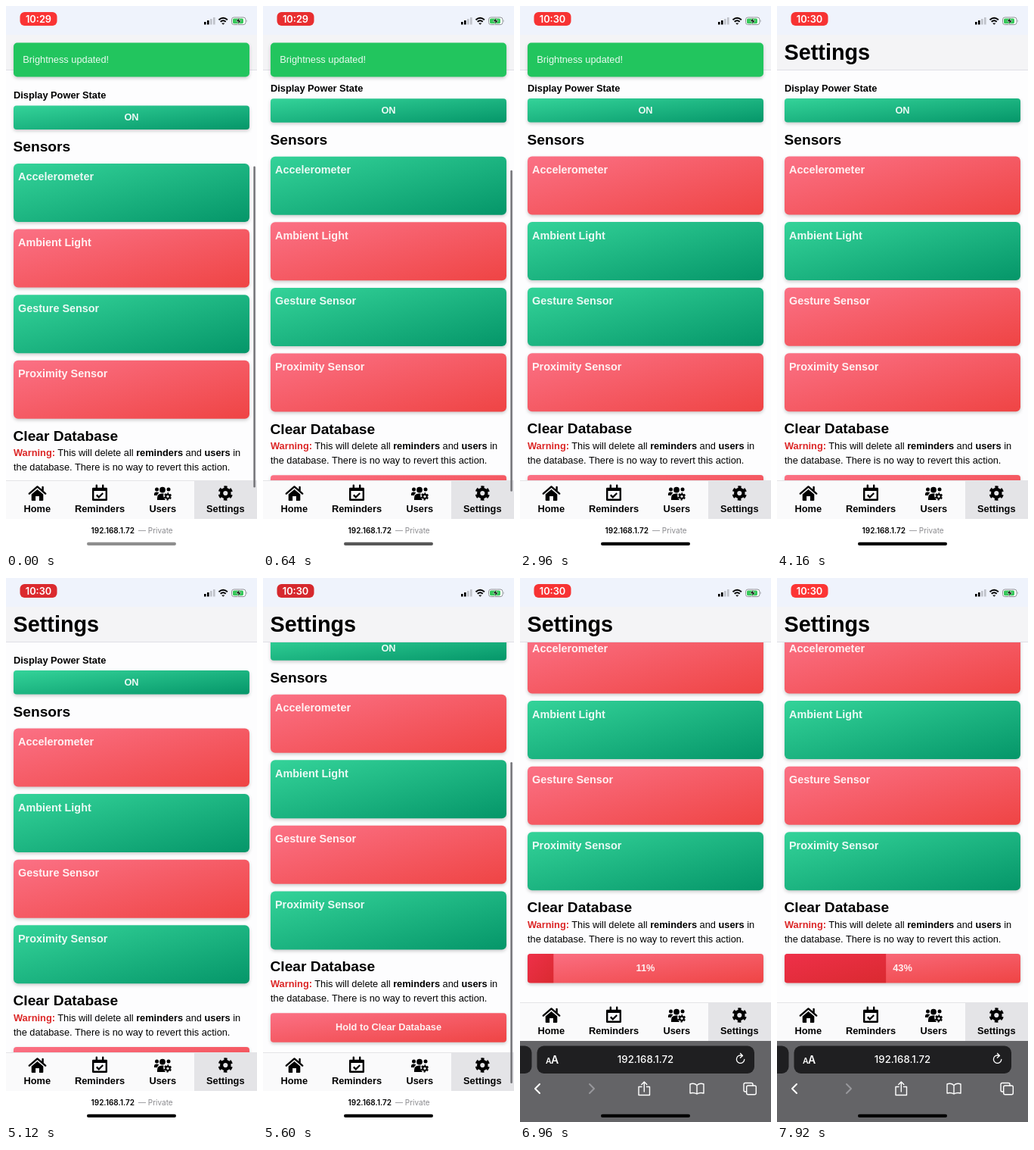
An HTML page for the animation above (8000 ms loop, 332 px wide and 718 px high).

```html
<!DOCTYPE html>
<html lang="en">
<head>
<meta charset="utf-8">
<title>Settings</title>
<style>
  html, body { margin: 0; height: 100%; overflow: hidden; background: #fdfdfe; }
  svg { display: block; width: 100vw; height: 100vh; font: 12.8px "Liberation Sans", Arial, sans-serif; }
  .b { font-weight: 700; }
  .h2 { font-size: 19.2px; }
  .mid { text-anchor: middle; }
  .pale { fill: #fff; fill-opacity: .9; }
  .ui { font-family: Inter, sans-serif; font-weight: 600; }
  .card { filter: drop-shadow(0 2px 2px #0003); }
  .line { fill: none; stroke: #fff; stroke-width: 1.6; stroke-linecap: round; stroke-linejoin: round; }
</style>
</head>
<body>
<svg viewBox="0 0 332 718">
  <defs>
    <linearGradient id="green" x2="1" y2="1"><stop stop-color="#34d399"/><stop offset="1" stop-color="#059669"/></linearGradient>
    <linearGradient id="red" x2="1" y2="1"><stop stop-color="#fb7185"/><stop offset="1" stop-color="#ef4444"/></linearGradient>
    <linearGradient id="deep" x2="1" y2="1"><stop stop-color="#ee3049"/><stop offset="1" stop-color="#da2a30"/></linearGradient>
    <clipPath id="holdClip"><rect x="10" y="619" width="312" height="38.5" rx="4"/></clipPath>
    <g id="gear" fill="none" stroke="#000">
      <circle r="5.2" stroke-width="4.2"/>
      <circle r="8" stroke-width="3.4" stroke-dasharray="4.4 3.978" stroke-dashoffset="2.2" transform="rotate(-90)"/>
    </g>
  </defs>

  <g id="content">
    <text class="b" x="10" y="112.5">Display Power State</text>
    <rect class="card" x="10" y="122" width="312" height="31.5" rx="4" fill="url(#green)"/>
    <text class="b mid pale" x="166" y="141.8">ON</text>
    <text class="b h2" x="9.5" y="182.5">Sensors</text>
    <g id="cards"></g>
    <text class="b h2" x="9.5" y="564.3">Clear Database</text>
    <text x="10" y="584.6"><tspan class="b" fill="#dc2626">Warning:</tspan> This will delete all <tspan class="b">reminders</tspan> and <tspan class="b">users</tspan> in</text>
    <text x="10" y="603.8">the database. There is no way to revert this action.</text>
    <rect class="card" x="10" y="619" width="312" height="38.5" rx="4" fill="url(#red)"/>
    <rect id="fill" x="10" y="619" height="38.5" fill="url(#deep)" clip-path="url(#holdClip)"/>
    <text id="hold" class="b mid pale" x="166" y="642.2"></text>
  </g>

  <rect width="332" height="38" fill="#eff3fc"/>
  <rect y="38" width="332" height="46" fill="#f4f4f6"/>
  <rect y="84" width="332" height="1" fill="#dfdfe6"/>
  <text class="b" x="9.5" y="71" font-size="28.8">Settings</text>

  <rect id="pill" x="18.5" y="8" width="49" height="18" rx="6"/>
  <text id="clock" class="ui mid" x="43" y="21.6" font-size="12.8" fill="#fff"></text>
  <path d="M262 21h2.6v3.5h-2.6zM266 19h2.6v5.5H266z"/>
  <path d="M270 17h2.6v7.5H270zM274 15h2.6v9.5H274z" fill="#bfc2c9"/>
  <g fill="none" stroke="#000" stroke-width="2">
    <path d="M281.5 18.2q5.7-5 11.4 0M283.7 20.8q3.5-3 7 0"/>
    <path d="M285.8 23l1.4 1.2 1.4-1.2z" stroke-width="1"/>
  </g>
  <rect x="298.5" y="15" width="18.5" height="9.6" rx="3" fill="#fff" stroke="#8d9096"/>
  <rect x="300" y="16.4" width="14" height="6.8" rx="1.6" fill="#34c759"/>
  <path d="M318.3 18v3.6q1.4-1.8 0-3.6" fill="#8d9096"/>
  <path d="M309 14.8l-4.6 5.6h3l-1 4.4 4.6-5.8h-3z" stroke="#fff" stroke-width=".5"/>

  <g id="toast">
    <rect class="card" x="10" y="48.5" width="312" height="45" rx="5" fill="#22c55e"/>
    <text class="pale" x="22.3" y="75">Brightness updated!</text>
  </g>

  <g id="dock">
    <rect y="626" width="332" height="51" fill="#fafafb"/>
    <rect x="249" y="626" width="83" height="51" fill="#e4e4e7"/>
    <rect y="626" width="332" height="1" fill="#e4e4e7"/>
    <g class="b mid">
      <text x="41.3" y="668.3">Home</text>
      <text x="124" y="668.3">Reminders</text>
      <text x="207.3" y="668.3">Users</text>
      <text x="290.3" y="668.3">Settings</text>
    </g>
    <path d="M30.8 643.6L41.5 634.4 52.2 643.6M48.6 640v-5" fill="none" stroke="#000" stroke-width="2.4" stroke-linecap="round" stroke-linejoin="round"/>
    <path d="M41.5 638l-7.8 6.6v7.4q0 1 1 1h4.4v-6h4.8v6h4.4q1 0 1-1v-7.4z"/>
    <path d="M115.2 637h17.6v14.8h-17.6zM119.8 632.8v4M128.2 632.8v4" fill="none" stroke="#000" stroke-width="2.4" stroke-linecap="round" stroke-linejoin="round"/>
    <path d="M115 636h18v4h-18z"/>
    <path d="M119.8 645.4l3 3 5.4-5.4" fill="none" stroke="#000" stroke-width="2.2"/>
    <circle cx="199.5" cy="638" r="2.5"/><circle cx="207" cy="638.6" r="3.9"/><circle cx="215" cy="638" r="2.5"/>
    <path d="M196 646v-1.800q0-2.700 3-2.700 2.200 0 3.400 1-2 1.400-2.400 3.500zM200 652v-2.500q0-6 6-6h2.600q-1.400 4.500 2.400 8.500z"/>
    <use href="#gear" transform="translate(214 647.300) scale(.53)"/>
    <use href="#gear" transform="translate(290.300 643)"/>

    <rect y="677" width="332" height="110" fill="#fff"/>
    <g id="smallBar" class="ui" font-size="10">
      <text x="112.5" y="696.3">192.168.1.72</text>
      <text x="175" y="696.3" fill="#8a8a8e" font-weight="400">— Private</text>
    </g>
    <g id="toolbar">
      <rect y="677" width="332" height="110" fill="#646467"/>
      <rect x="-20" y="683.500" width="35.500" height="36.500" rx="9" fill="#1f1f21"/>
      <rect x="22.500" y="683.500" width="287.500" height="36.500" rx="9" fill="#1f1f21"/>
      <g class="ui" fill="#fff">
        <text x="34" y="706.500" font-size="10.500">A</text><text x="41" y="706.500" font-size="14">A</text>
        <text class="mid" x="166" y="706" font-size="13.200" font-weight="500">192.168.1.72</text>
      </g>
      <g class="line">
        <path d="M296.800 701.500a5.200 5.200 0 1 1-3-5M291.500 693.500l3 3-3.200 2.700" stroke-width="1.300"/>
        <path d="M26 734l-6 6 6 6" stroke-width="2"/>
        <path d="M92 734l6 6-6 6" stroke-width="2" stroke="#98989c"/>
        <path d="M161 737.500h-4v11h14.500v-11h-4M164.300 744v-12.500M160.800 734.500l3.500-3.500 3.500 3.500" stroke-width="1.400"/>
        <path d="M234 735.500q-4-3.500-9-1.500v12q5-1.500 9 1 4-2.500 9-1v-12q-5-2-9 1.500v11.500" stroke-width="1.400"/>
        <path d="M299.500 744h-1.500q-2 0-2-2v-7.500q0-2 2-2h8q2 0 2 2v1.500" stroke-width="1.400"/>
        <rect x="299.700" y="736" width="12.600" height="11.800" rx="2" stroke-width="1.400"/>
      </g>
    </g>
  </g>
  <rect id="homeBar" x="107" y="707.800" width="118" height="4.200" rx="2.100"/>
  <rect id="scrollbar" x="327.300" width="2.600" rx="1.300" fill="#77777b"/>
</svg>

<script>
  const LOOP = 8000, EXPAND = 66;
  const $ = id => document.getElementById(id);
  const set = (id, attrs) => { for (const k in attrs) $(id).setAttribute(k, attrs[k]); };
  const progress = (t, from, to) => Math.min(1, Math.max(0, (t - from) / (to - from)));
  const smooth = p => p * p * (3 - 2 * p);
  const easeOut = p => 1 - (1 - p) ** 3;

  const sensors = [
    { name: 'Accelerometer', on: true, toggle: 1150 },
    { name: 'Ambient Light', on: false, toggle: 2350 },
    { name: 'Gesture Sensor', on: true, toggle: 3650 },
    { name: 'Proximity Sensor', on: false, toggle: 4800 },
  ];
  $('cards').innerHTML = sensors.map(({ name }, i) => {
    const y = 198.5 + i * 86.6;
    return `<rect id="card${i}" class="card" x="10" y="${y}" width="312" height="77" rx="6"/>
      <text class="b pale" x="16" y="${y + 22.5}" font-size="14.4">${name}</text>`;
  }).join('');

  function render(t) {
    const scroll = -9.5 * (1 - progress(t, 0, 900)) ** 3 + 57 * smooth(progress(t, 5330, 5716));
    const expand = easeOut(progress(t, 5676, 6000));
    const lift = EXPAND * expand;
    set('content', { transform: `translate(0 ${-scroll - lift})` });
    set('dock', { transform: `translate(0 ${-lift})` });
    set('toolbar', { opacity: expand });
    set('smallBar', { opacity: 1 - expand });
    set('scrollbar', {
      y: 217 + .58 * scroll,
      height: 424 - lift,
      opacity: t < 5000 ? 1 - progress(t, 1700, 1950) : progress(t, 5330, 5430) - progress(t, 6500, 6800),
    });

    sensors.forEach((s, i) => set('card' + i, { fill: s.on !== (t >= s.toggle) ? 'url(#green)' : 'url(#red)' }));
    set('toast', { opacity: 1 - progress(t, 3400, 3650) });

    const held = Math.floor(Math.max(0, t - 6630) / 30);
    set('fill', { width: 3.12 * held });
    $('hold').textContent = t < 6630 ? 'Hold to Clear Database' : held + '%';

    const glow = .5 + .5 * Math.cos((t - 3560) / 4000 * 2 * Math.PI);
    set('pill', { fill: `rgb(${214 + 41 * glow},${40 + 14 * glow},${45 + 8 * glow})` });
    $('clock').textContent = t < 2200 ? '10:29' : '10:30';
    const grey = 142 * (1 - progress(t, 0, 1700));
    set('homeBar', { fill: `rgb(${grey},${grey},${grey})` });
  }

  function tick() {
    render(performance.now() % LOOP);
    requestAnimationFrame(tick);
  }
  tick();
</script>
</body>
</html>
```
